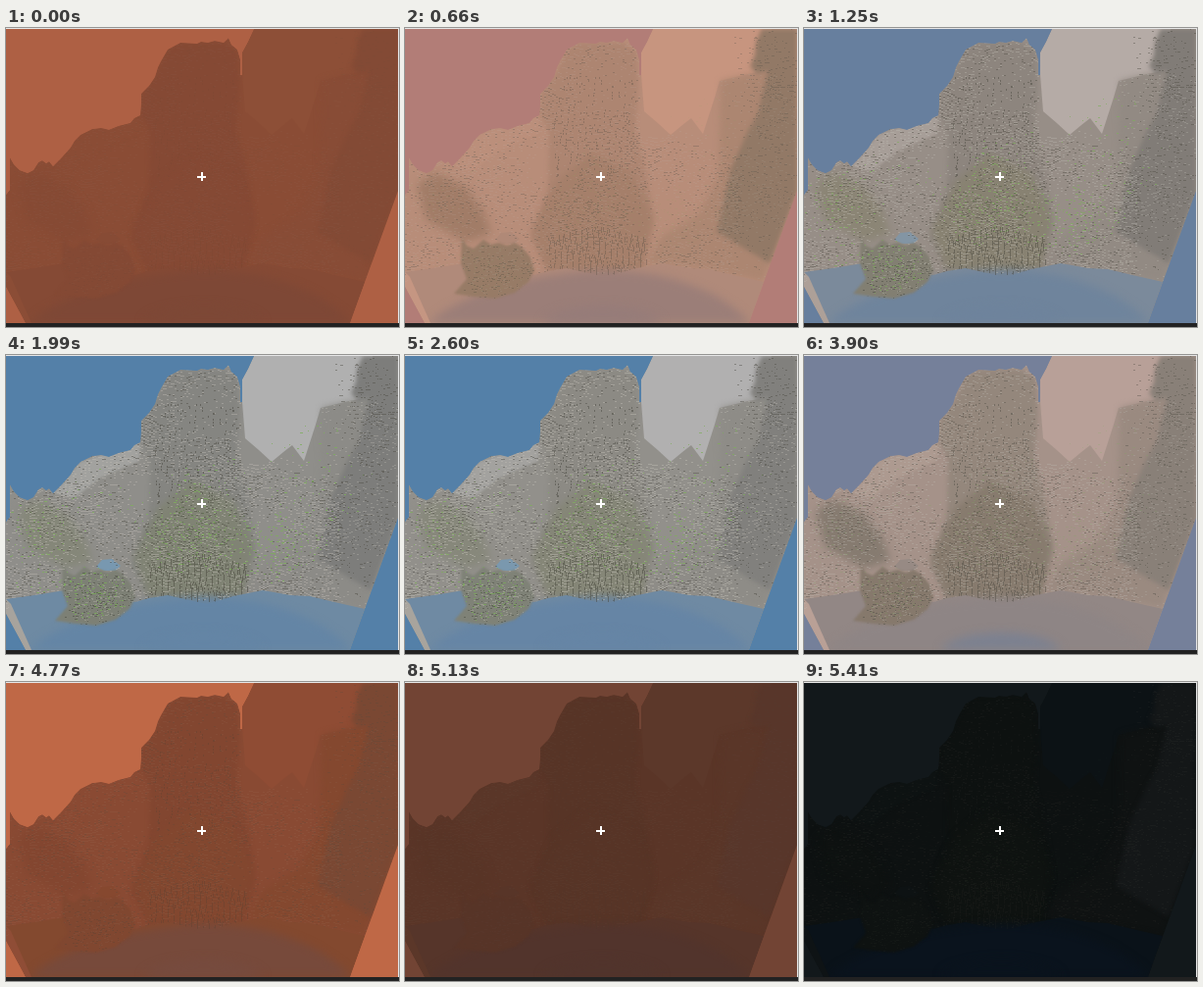
An HTML page with a canvas that plays this animation: 401 px wide and 305 px high, repeating every 5920 ms.

```html
<!DOCTYPE html>
<html lang="en">
<head>
<meta charset="utf-8">
<title>Day cycle over a voxel bay</title>
<style>
html, body { margin: 0; width: 100%; height: 100%; overflow: hidden; background: #222; }
canvas { display: block; }
</style>
</head>
<body>
<canvas id="view" width="401" height="305"></canvas>
<script>
const W = 401, H = 305, LOOP = 5920;
const ctx = document.getElementById('view').getContext('2d');

// Shapes, back to front. Colours: dawn, soft, day, late day, evening, sunset, night.
const LAND = 'M0 170L4 165 4 132 8 139 14 145 22 148 28 145 33 137 37 135 41 138 44 136 48 141 57 132 66 122 70 115 76 109 88 103 97 102 105 104 115 100 127 97 131 92 137 89 138 77 138 67 146 59 152 50 155 40 158 34 165 22 178 15 195 16 199 14 206 15 213 13 222 15 227 10 230 17 236 22 239 32 239 48 241 48 241 25 247 14 253 1 400 1 400 166 351 301 20 301 0 264Z';
const WATER = 'M0 249L22 246 42 243 60 240 132 252 146 248 165 245 182 249 205 254 232 246 262 240 290 245 310 246 335 252 366 259 351 301 20 301Z';
const ISLE = 'M58 213L63 222 70 225 80 216 88 221 96 219 104 222 112 219 120 224 128 234 132 247 126 259 112 270 92 276 70 274 50 271 63 256 57 240Z';
const PARTS = [
  { d: LAND, blur: 0, c: '8a4c35 b88d79 8f8e8a 96938d a59289 894a33 0d1111' },
  { d: 'M241 48L241 25 247 14 253 1 374 1 371 43 350 47 321 54 315 74 304 108 292 92 283 99 271 109 258 97 244 85Z', blur: 0,
    c: '8d4f37 c7957f b0b0b0 b3b1af b8a098 8f4c34 0c1215' },
  { d: 'M48 141L57 132 76 109 97 102 137 89 136 108 95 126 70 146Z', blur: 1,
    c: '8a4c35 bb8f7b a2a29f a5a39e ad9a90 8a4a33 0d1212' },
  { d: 'M139 67L152 50 165 22 178 15 222 15 236 24 238 60 235 105 246 145 254 200 241 246 200 252 146 248 128 214 146 165 147 105 138 89Z', blur: 2,
    c: '854934 ad8571 858581 938f88 94877c 824630 0d1110' },
  { d: 'M154 157L190 128 232 148 252 192 243 245 203 254 145 246 130 206Z', blur: 3,
    c: '854934 a57f6a 808374 8a8a7b 877b6e 82472f 0e1210' },
  { d: 'M12 160L30 147 62 162 80 186 88 210 62 218 22 196Z', blur: 4,
    c: '864a34 a17c67 858779 898a7e 867b70 834630 0d1110' },
  { d: 'M322 54L348 48 371 44 385 60 400 120 400 166 365 258 300 245 246 240 262 212 300 190 320 150Z', blur: 3,
    c: '884c36 ac8671 8c8b87 908e88 9a8a80 84482f 0f1212' },
  { d: 'M364 1L400 1 400 166 372 240 318 208 332 145 350 105 360 88 370 44 359 47 352 39 357 28 358 15Z', blur: 2,
    c: '834a35 927966 7d7d7b 85837f 898078 7a4833 141718' },
  { d: WATER, blur: 0, c: '854a35 b08a7a 6e8aa3 708ba2 928785 83492f 0a1219' },
  { d: 'M24 301C70 262 145 250 200 247C260 247 320 264 352 301Z', blur: 4,
    c: '7e4836 9b7e78 6485a5 6886a4 8e8585 774a3b 0a131d' },
  { d: 'M140 301C155 279 243 276 262 301Z', blur: 5,
    c: '7d4836 967c79 6485a5 6886a4 7c8190 764b3e 0a131d' },
  { d: 'M92 216L98 209 108 208 117 215 112 220 100 220Z', blur: 0,
    c: '874b35 b08977 7898b0 7d98ab 978a84 86482f 0d1213' },
  { d: ISLE, blur: 1, c: '84493480' },
  { d: 'M0 249L5 254 26 301 20 301 0 264Z', blur: 0,
    c: '8b4d36 c59682 a7a39d a9a59e b9a096 8f4d36 0e1315' }
];
PARTS[12].c = '844934 977b66 7d8075 82847a 86796c 804730 0e1211';
const SKY = 'ae6044 b27d77 5480a8 5480a8 75809a bf6846 12181b';
const GRAIN = {
  pale: [.03, .12, .42, .5, .3, .05, .01],
  green: [0, .08, .8, .65, .2, 0, .02],
  dark: [.05, .26, .46, .42, .36, .2, .12]
};

// Time to palette column, then [start, step] of the clock ticks.
const STOPS = [[0, 0], [150, 5], [660, 1], [1400, 2], [1990, 2], [3190, 3], [3450, 3],
  [3900, 4], [4220, 1], [4770, 5], [4870, 0], [5410, 6], [LOOP, 6]];
const TICKS = [[0, 100], [100, 93.4], [760, 49], [3900, 49.2], [4540, 76.7], [5180, 115], [5410, 510]];

const parse = s => s.split(' ').map(h => [0, 2, 4].map(i => parseInt(h.substr(i, 2), 16)));
const sky = parse(SKY);
for (const p of PARTS) { p.path = new Path2D(p.d); p.rgb = parse(p.c); }
const land = PARTS[0].path, water = new Path2D(WATER), isle = new Path2D(ISLE);

let seed = 7;
const rnd = () => (seed = seed * 16807 % 2147483647) / 2147483647;

function layer(draw) {
  const cv = document.createElement('canvas');
  cv.width = W; cv.height = H;
  const g = cv.getContext('2d');
  g.clip(land);
  draw(g);
  return cv;
}

// Dashes along wobbling contour rings, thinning towards the rim.
function rings(g, color, cx, cy, rx, ry, density) {
  g.fillStyle = color;
  const gap = 3.4 / ry;
  for (let r = gap; r < 1; r += gap) {
    const da = 3 / (rx * r + 4);
    for (let a = 0; a < Math.PI * 2; a += da) {
      if (rnd() > density * (1.15 - r * r)) continue;
      const wob = r * (1 + .12 * Math.sin(a * 5 + cx) + .06 * Math.sin(a * 11 + r * 9));
      const x = cx + rx * wob * Math.cos(a), y = cy + ry * wob * Math.sin(a);
      g.fillRect(x | 0, y | 0, 1 + rnd() * 2.4 | 0, 1);
    }
  }
}

function cutWater(g) {
  g.globalCompositeOperation = 'destination-out';
  g.fill(water);
  g.globalCompositeOperation = 'source-over';
}

// Rows of short dashes bent by the relief.
function rows(g, color, x0, x1, y0, y1, gap, chance) {
  g.fillStyle = color;
  for (let y = y0; y < y1; y += gap)
    for (let x = x0; x < x1; x += 2) {
      const patch = Math.sin(x / 23 + y / 31) + Math.sin(y / 17 - x / 41);
      if (rnd() < chance * (1 + patch * .45))
        g.fillRect(x, y + 3 * Math.sin(x / 12) + 2 * Math.sin(x / 5 + y / 9) | 0, 2, 1);
    }
}

const grains = {
  pale: layer(g => {
    rows(g, '#c0bdb5', 0, 240, 10, 260, 3, .36);
    rows(g, '#c0bdb5', 240, 340, 110, 250, 3, .36);
    rows(g, '#b4b1aa', 320, 400, 50, 260, 4, .2);
    cutWater(g);
    g.save();
    g.clip(isle);
    rings(g, '#b5b3a8', 92, 248, 42, 32, .4);
    g.restore();
  }),
  green: layer(g => {
    const zones = [[192, 182, 62, 44, .42], [272, 196, 48, 42, .36], [32, 186, 38, 40, .2],
      [205, 125, 55, 28, .11], [92, 150, 55, 34, .09], [310, 130, 60, 70, .08], [55, 235, 45, 30, .13]];
    for (const z of zones) rings(g, '#7fae5e', ...z);
    cutWater(g);
    g.save();
    g.clip(isle);
    rings(g, '#7aa85a', 92, 245, 40, 30, .4);
    g.restore();
  }),
  dark: layer(g => {
    rows(g, '#4c4a42', 0, 240, 20, 255, 3, .16);
    rows(g, '#4c4a42', 240, 345, 120, 250, 3, .15);
    rings(g, '#4c4a42', 372, 60, 42, 75, .36);
    rings(g, '#4c4a42', 365, 170, 50, 75, .26);
    rings(g, '#45463c', 192, 182, 62, 44, .28);
    // Ribs on the pillar and on the cliff under the mound.
    g.fillStyle = '#3f3e36';
    for (let x = 146; x < 248; x += 3)
      for (let y = 202 + Math.abs(x - 196) * .25; y < 251; y += 2)
        if (rnd() < .62) g.fillRect(x + 1.5 * Math.sin(y / 9 + x) | 0, y | 0, 1, 2);
    for (let x = 154; x < 235; x += 4)
      for (let y = 50; y < 150; y += 3)
        if (rnd() < .22) g.fillRect(x + 2 * Math.sin(y / 14 + x) | 0, y, 1, 2);
    cutWater(g);
    g.save();
    g.clip(isle);
    rings(g, '#3f4138', 90, 250, 44, 32, .42);
    g.restore();
  })
};

const mix = (a, b, k) => a + (b - a) * k;

function column(t) {
  let i = 0;
  while (t >= STOPS[i + 1][0]) i++;
  const [t0, a] = STOPS[i], [t1, b] = STOPS[i + 1];
  return { a, b, k: (t - t0) / (t1 - t0) };
}

function tick(t) {
  let s = TICKS[0];
  for (const x of TICKS) if (t >= x[0]) s = x;
  return s[0] + Math.floor((t - s[0] + .01) / s[1]) * s[1];
}

function paint(t) {
  const { a, b, k } = column(t);
  const tone = c => `rgb(${c[a].map((v, i) => Math.round(mix(v, c[b][i], k)))})`;
  ctx.fillStyle = tone(sky);
  ctx.fillRect(0, 0, W, H);
  ctx.save();
  ctx.clip(land);
  for (const p of PARTS) {
    ctx.filter = p.blur ? `blur(${p.blur}px)` : 'none';
    ctx.fillStyle = tone(p.rgb);
    ctx.fill(p.path);
  }
  ctx.filter = 'none';
  for (const name in grains) {
    ctx.globalAlpha = mix(GRAIN[name][a], GRAIN[name][b], k);
    ctx.drawImage(grains[name], 0, 0);
  }
  ctx.restore();

  ctx.fillStyle = '#fff';
  ctx.fillRect(195, 151, 9, 2);
  ctx.fillRect(199, 147, 2, 9);
  ctx.fillStyle = '#e6e6e6';
  ctx.fillRect(0, 0, W, 1);
  ctx.fillRect(400, 0, 1, 301);
  ctx.fillStyle = '#222';
  ctx.fillRect(0, 301, W, 4);
}

const start = performance.now();
let shown = -1;
function frame() {
  const t = tick((performance.now() - start) % LOOP);
  if (t !== shown) paint(shown = t);
  requestAnimationFrame(frame);
}
frame();
</script>
</body>
</html>
```
